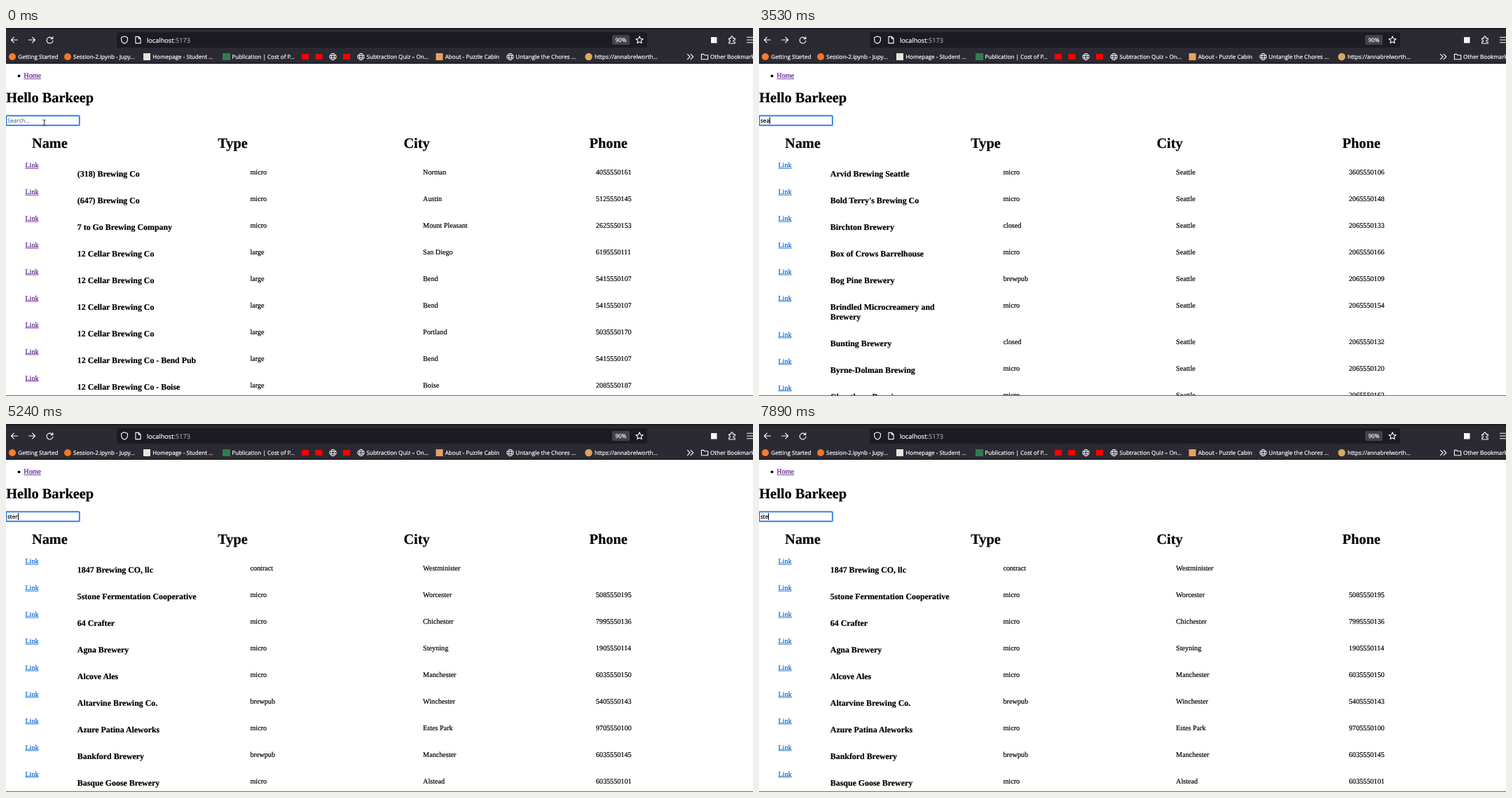
Recreate the animation shown at these times as an HTML page with a canvas. Size 1066 by 525 pixels, loop 8 s.

```html
<!DOCTYPE html>
<html lang="en">
<head>
<meta charset="utf-8">
<title>Search list</title>
<style>
html, body { margin: 0; width: 100%; height: 100%; overflow: hidden; background: #fff; }
canvas { display: block; width: 1066px; height: 525px; }
</style>
</head>
<body>
<canvas id="stage" width="1066" height="525"></canvas>
<script>
const ctx = document.getElementById('stage').getContext('2d');
ctx.textRendering = 'geometricPrecision';
const LOOP = 8000;
const SERIF = '"Liberation Serif", serif';
const SANS = '"Open Sans", sans-serif';
const BODY = `10.17px ${SERIF}`;
const NAME = `bold 11.9px ${SERIF}`;
const HEAD = `bold 20.33px ${SERIF}`;
const FIELD = `8.1px ${SANS}`;
const LIGHT = '#fbfbfe', VISITED = '#551a8b', LINK = '#0060d0';

// name|type|city|area code and last digits; "/" breaks the name
const rows = `(318) Brewing Co|micro|Norman|405 61
(647) Brewing Co|micro|Austin|512 45
7 to Go Brewing Company|micro|Mount Pleasant|262 53
12 Cellar Brewing Co|large|San Diego|619 11
12 Cellar Brewing Co|large|Bend|541 07
12 Cellar Brewing Co|large|Bend|541 07
12 Cellar Brewing Co|large|Portland|503 70
12 Cellar Brewing Co - Bend Pub|large|Bend|541 07
12 Cellar Brewing Co - Boise|large|Boise|208 87
1847 Brewing CO, llc|contract|Westminister|
2 Mills Brewing|micro|Ashford|44123 42
5stone Fermentation Cooperative|micro|Worcester|508 95
64 Crafter|micro|Chichester|799 36
Agna Brewery|micro|Steyning|190 14
Alcove Ales|micro|Manchester|603 50
Altarvine Brewing Co.|brewpub|Winchester|540 43
Ardent Hollow Farmhouse and/Brewery|micro|Houston|713 28
Arvid Brewing Seattle|micro|Seattle|360 06
Azure Patina Aleworks|micro|Estes Park|970 00
Bold Terry's Brewing Co|micro|Seattle|206 48
Bankford Brewery|brewpub|Manchester|603 45
Basque Goose Brewery|micro|Alstead|603 01
Benfold Brewing Company|micro|Sterling|571 39
Birchton Brewery|closed|Seattle|206 33
Box of Crows Barrelhouse|micro|Seattle|206 66
Bog Pine Brewery|brewpub|Seattle|206 09
Bit Farm Brewing Company LLC|planning|Sterling|571 93
Butler Elk Tinker Rustic Ales|micro|Chelsea|734 12
Blackfen Brewing|micro|Leicester|116 24
Brindled Microcreamery and/Brewery|micro|Seattle|206 54
Brambleford Craft Brewing|micro|Chelsea|802 38
Bunting Brewery|closed|Seattle|206 32
Byrne-Dolman Brewing|micro|Seattle|206 20
Clearthorn Brewing|micro|Seattle|206 62
Grove Meridian Restaurants,/Silverbrook Tavern|brewpub|Sterling|571 05
Glen Mist Brewing Co. LLC|micro|Westerly|410 92
Posts & Linen Brewing Company|brewpub|Sterling|970 21
Russet Toad Brewing Company|micro|Sterling|703 11
Thistlemere Brewing Company|micro|Sterling|703 63`.split('\n').map(line => {
  const [name, type, city, phone] = line.split('|');
  return { name: name.split('/'), type, city, phone: phone.replace(' ', '55501') };
});

// time, typed text, query the list shows (it lags the field), caret
const steps = [
  [0, '', '', 0], [250, '', '', 1],
  [530, 's', '', 1], [680, 'se', 's', 1], [830, 'sea', 'se', 1], [980, 'sea', 'sea', 1],
  [1230, 'seat', 'sea', 1], [1350, 'seatt', 'seat', 1],
  [1910, 'seattl', 'seatt', 1], [2045, 'seattle', 'seattle', 1], [2460, 'seattle', 'seattle', 0],
  [2860, 'seattl', 'seattle', 1], [3040, 'seatt', 'seattl', 1], [3220, 'seat', 'seat', 1],
  [3400, 'sea', 'seat', 1], [3590, 'se', 'sea', 1], [3780, 'se', 'se', 1],
  [3930, 's', 's', 1], [4050, '', '', 1],
  [4420, 's', '', 1], [4555, 'st', 's', 1], [4690, 'st', 'st', 1],
  [4970, 'ste', 'st', 1], [5105, 'ste', 'ste', 1], [5240, 'ster', 'ste', 1], [5390, 'ster', 'ster', 1],
  [5790, 'sterl', 'ster', 1], [5910, 'sterl', 'sterl', 1], [6070, 'sterli', 'sterl', 1],
  [6230, 'sterli', 'sterli', 1], [6390, 'sterlin', 'sterlin', 1], [6550, 'sterling', 'sterling', 1],
  [7110, 'sterlin', 'sterling', 1], [7240, 'sterli', 'sterlin', 1], [7370, 'sterl', 'sterli', 1],
  [7500, 'sterl', 'sterl', 1], [7630, 'ster', 'sterl', 1], [7760, 'ste', 'ster', 1], [7890, 'ste', 'ste', 1]
];

// a hairline stroke gives the letters a slightly darker weight
function text(str, x, y, font, color = '#000') {
  ctx.font = font;
  ctx.fillStyle = ctx.strokeStyle = color;
  ctx.lineWidth = 0.2;
  ctx.fillText(str, x, y);
  ctx.strokeText(str, x, y);
}

function rect(x, y, w, h, color, r = 0) {
  ctx.fillStyle = color;
  ctx.beginPath();
  ctx.roundRect(x, y, w, h, r);
  ctx.fill();
}

function disc(x, y, r, color) {
  ctx.fillStyle = color;
  ctx.beginPath();
  ctx.arc(x, y, r, 0, 7);
  ctx.fill();
}

function stroke(path, x = 0, y = 0, color = LIGHT, width = 1.1) {
  ctx.save();
  ctx.translate(x, y);
  ctx.strokeStyle = color;
  ctx.lineWidth = width;
  ctx.lineCap = ctx.lineJoin = 'round';
  ctx.stroke(new Path2D(path));
  ctx.restore();
}

function link(str, x, y, color) {
  text(str, x, y, BODY, color);
  rect(x, y + 1, ctx.measureText(str).width, 0.8, color);
}

function globe(x, y) {
  stroke('M-4.6 0a4.6 4.6 0 1 0 9.2 0a4.6 4.6 0 1 0-9.2 0M-2 0a2 4.6 0 1 0 4 0a2 4.6 0 1 0-4 0M-4.3-1.6h8.6M-4.3 1.6h8.6', x, y, LIGHT, 0.9);
}

function star(x, y) {
  let path = '';
  for (let i = 0; i < 10; i++) {
    const a = i * Math.PI / 5 - Math.PI / 2, r = i % 2 ? 2.5 : 5.4;
    path += (i ? 'L' : 'M') + r * Math.cos(a) + ' ' + r * Math.sin(a);
  }
  stroke(path + 'Z', x, y);
}

function browserBar() {
  rect(0, 0, 1066, 51, '#2b2a33');
  rect(0, 0, 1066, 2, '#1c1b22');
  rect(0, 50, 1066, 1, '#0c0c0d');
  stroke('M4.5 0H-4.5M-.7-3.8L-4.5 0L-.7 3.8', 12, 17);
  stroke('M-4.5 0H4.5M.7-3.8L4.5 0L.7 3.8', 37, 17);
  stroke('M3.6-2.6A4.4 4.4 0 1 0 4.4.6M4.3-5v3h-3', 62.5, 17.5);

  rect(158, 6, 757, 22, '#1c1b22', 3);
  stroke('M0-5.2L4.4-3.6V-.6C4.4 2 2.6 4.2 0 5.2C-2.6 4.2-4.4 2-4.4-.6V-3.6Z', 169, 17);
  stroke('M-3.6-4.6H1L3.6-2V4.6H-3.6ZM.8-4.6V-1.8H3.6', 188.5, 17);
  const urlFont = `9.2px ${SANS}`;
  text('localhost', 201, 20.5, urlFont, LIGHT);
  text(':5173', 201 + ctx.measureText('localhost').width, 20.5, urlFont, '#9e9da6');
  rect(865, 10, 25, 14, '#42414d', 2);
  text('90%', 869.5, 20, `8px ${SANS}`, LIGHT);
  star(904, 17.2);
  rect(1006, 13, 8.5, 8.5, LIGHT);
  stroke('M-4.2-2.4h2.6v-1.2a1.5 1.5 0 0 1 3 0v1.2h2.8v2.6h-1a1.4 1.4 0 0 0 0 2.8h1v2h-8.4v-2.4h.9a1.4 1.4 0 0 0 0-2.6h-.9Z', 1036, 17);
  stroke('M0 0h8M0 3.7h8M0 7.4h8', 1057.5, 13.3);

  const mark = (str, x) => text(str, x, 44.2, `8.1px ${SANS}`, LIGHT);
  disc(9, 41, 5, '#ff7a2e');
  mark('Getting Started', 17.3);
  disc(88, 41, 5, '#f37726');
  mark('Session-2.ipynb - Jupy...', 96);
  rect(196, 36, 10, 10, '#dfe9df');
  mark('Homepage - Student ...', 209.3);
  rect(309, 36, 11, 10, '#2f7d4f');
  mark('Publication | Cost of P...', 322.3);
  for (const x of [422, 441.5, 481]) rect(x, 37, 10, 8, '#f00');
  globe(466.5, 41);
  globe(506.5, 41);
  mark('Subtraction Quiz – On...', 514.5);
  rect(613.5, 36, 10, 10, '#e8a35c');
  mark('About - Puzzle Cabin', 626.7);
  globe(719.5, 41);
  mark('Untangle the Chores ...', 727.3);
  disc(831.5, 41, 5.2, '#d9a860');
  mark('https://annabrelworth...', 840);
  stroke('M0-3.6L3.6 0L0 3.6M4.6-3.6L8.2 0L4.6 3.6', 972.5, 41);
  stroke('M-4.6-3.6h3.2l1.3 1.4h4.8v6h-9.3Z', 997, 41);
  mark('Other Bookmarks', 1005);
}

function searchField(value, caret) {
  rect(-1.5, 123.6, 108, 16.8, 'rgba(0,96,223,.25)', 2.5);
  rect(-0.2, 124.8, 105.4, 14.4, '#0060df', 1.5);
  rect(1, 126, 103, 12, '#fff', 0.5);
  text(value || 'Search...', 2, 135, FIELD, value ? '#000' : '#767676');
  if (caret) rect(Math.round(2 + (value ? ctx.measureText(value).width : 0)), 127, 1, 10, '#000');
}

function table(query) {
  const found = rows.filter(r => r.city.toLowerCase().includes(query));
  // the page is a little wider when nothing needs scrolling
  const wide = found.length < 9;
  const [headX, headGap, linkX, cellX, cellGap] = wide
    ? [38.4, 268.2, 28.5, 105.6, 249] : [37, 265.2, 27.4, 101.8, 246.65];
  ['Name', 'Type', 'City', 'Phone'].forEach((h, i) => text(h, headX + i * headGap, 170.9, HEAD));
  let y = 198.9;
  for (const r of found) {
    if (y > 540) break;
    link('Link', linkX, y, query ? LINK : VISITED);
    r.name.forEach((part, i) => text(part, cellX, y + 13.5 + i * 14, NAME));
    [r.type, r.city, r.phone].forEach((cell, i) => text(cell, cellX + (i + 1) * cellGap, y + 10.1, BODY));
    y += 37.95 + (r.name.length - 1) * 14;
  }
}

function draw(t) {
  const [, value, query, caret] = steps.findLast(s => s[0] <= t);
  rect(0, 0, 1066, 525, '#fff');
  browserBar();
  disc(18.5, 68.3, 1.9, '#000');
  link('Home', 25.3, 71.3, VISITED);
  text('Hello Barkeep', 0.3, 106, HEAD);
  searchField(value, caret);
  if (t < 530) stroke('M-1.8-4Q0-4 0-3V3Q0 4-1.8 4M1.8-4Q0-4 0-3M0 3Q0 4 1.8 4', 54.5, 135, '#222', 0.9);
  table(query);
  rect(0, 524, 1066, 1, '#6e6e74');
}

const start = performance.now();
function frame() {
  draw((performance.now() - start) % LOOP);
  requestAnimationFrame(frame);
}
frame();
</script>
</body>
</html>
```
